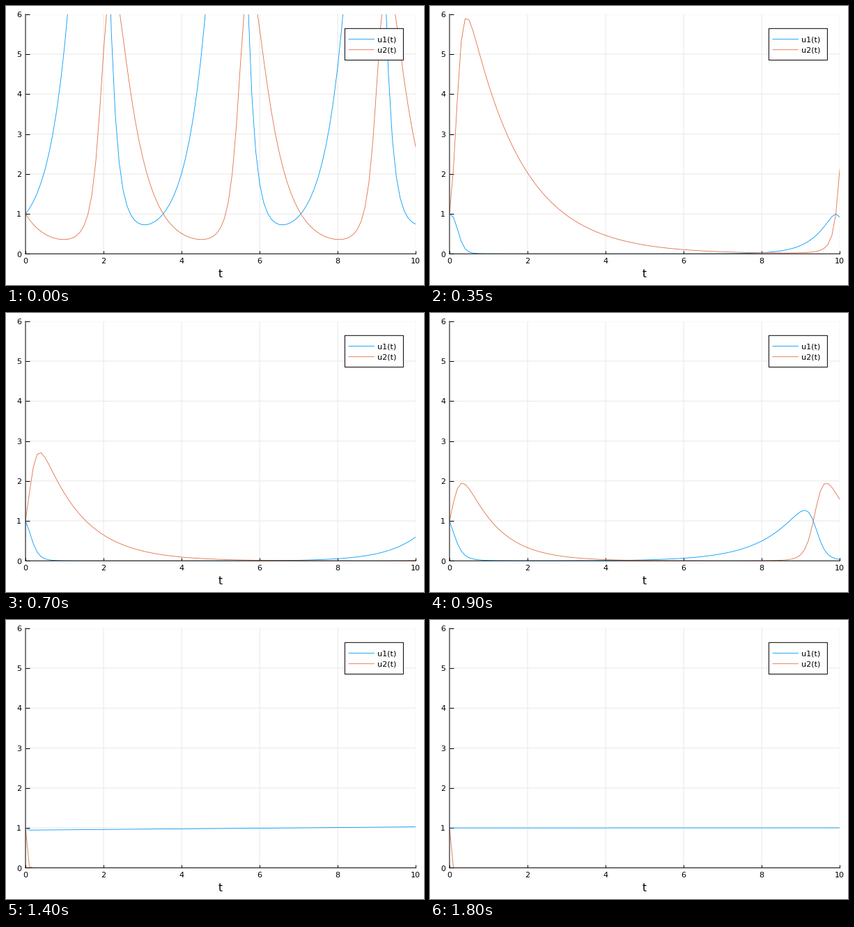
Animation of 600x400 px, one loop 1.9 s. Source, as a matplotlib script:

```python
import numpy as np
import matplotlib.pyplot as plt
from matplotlib.animation import FuncAnimation
from matplotlib.patches import Rectangle

plt.rcParams.update({"font.family": "DejaVu Sans", "path.snap": False})

W, H, DPI = 600, 400, 100
LEFT, RIGHT, TOP, BOTTOM = 28.0, 588.2, 11.8, 355.3
BLUE, ORANGE, GRID = "#009afa", "#e26f46", "#e8e8e8"
PX = 72 / DPI
CURVE = 0.85 * PX
LAST, HOLD = 35, 1  # last fitting step, extra frames on the first one

# Predator-prey parameters at a few fitting steps:
# prey growth, predation, predator death, predator gain
POSES = {
    0: (2.2, 1.0, 2.0, 0.4),
    6: (2.0775, 1.96, 0.74, 8.5),
    13: (1.214, 3.2, 0.965, 7.18),
    17: (1.02, 3.56, 1.21, 5.8),
    23: (0.0825, 4.41, 4.7, -2.0),
    27: (0.0083, 2.15, 22.0, -16.0),
    LAST: (0.0003, 0.15, 60.0, -45.0),
}


def fit_path():
    """Rates move geometrically between poses, the gain linearly."""
    steps = np.arange(LAST + 1)
    rows = np.array(list(POSES.values())).T
    rates = [np.exp(np.interp(steps, list(POSES), np.log(r))) for r in rows[:3]]
    return *rates, np.interp(steps, list(POSES), rows[3])


def solve(sub=20, save=0.1, count=100):
    """Integrate all fitting steps at once with RK4."""
    growth, predation, death, gain = fit_path()

    def slope(u):
        x, y = u
        return np.array([x * (growth - predation * y), y * (gain * x - death)])

    h = save / sub
    u = np.ones((2, LAST + 1))
    out = [u]
    for _ in range(count):
        for _ in range(sub):
            k1 = slope(u)
            k2 = slope(u + h / 2 * k1)
            k3 = slope(u + h / 2 * k2)
            k4 = slope(u + h * k3)
            u = u + h / 6 * (k1 + 2 * k2 + 2 * k3 + k4)
        out.append(u)
    return np.array(out)


t = np.linspace(0, 10, 101)
sol = solve()

fig = plt.figure(figsize=(W / DPI, H / DPI), dpi=DPI, facecolor="white")

ax = fig.add_axes([LEFT / W, 1 - BOTTOM / H,
                   (RIGHT - LEFT) / W, (BOTTOM - TOP) / H])
ax.set(xlim=(0, 10), ylim=(0, 6), xticks=range(0, 11, 2), yticks=range(7))
ax.set_axisbelow(True)
ax.grid(color=GRID, linewidth=PX)
ax.spines[["top", "right"]].set_visible(False)
ax.spines[["left", "bottom"]].set_linewidth(PX)
ax.tick_params(direction="in", width=PX, labelbottom=False, labelleft=False)
ax.tick_params(axis="x", length=4 * PX)
ax.tick_params(axis="y", length=6 * PX)
prey, = ax.plot([], [], color=BLUE, lw=CURVE)
pred, = ax.plot([], [], color=ORANGE, lw=CURVE)

# Overlay in pixel coordinates for labels and legend
top = fig.add_axes([0, 0, 1, 1], zorder=2)
top.set(xlim=(0, W), ylim=(H, 0))
top.axis("off")


def put(x, y, text, size=8, ha="center"):
    top.text(x, y, text, fontsize=size, ha=ha, va="baseline", color="black")


for v in range(0, 11, 2):
    put(LEFT - 0.5 + (RIGHT - LEFT) * v / 10, 369, str(v))
for v in range(7):
    put(22.3, BOTTOM - (BOTTOM - TOP) * v / 6 + 4.2, str(v), ha="right")
put((LEFT + RIGHT) / 2 - 0.5, 389, "t", size=11)

top.add_patch(Rectangle((486.4, 32.3), 84, 45.3, fc="white", ec="black", lw=PX))
for y, color, name in ((47.6, BLUE, "u1(t)"), (62.7, ORANGE, "u2(t)")):
    top.plot([492, 528.5], [y, y], color=color, lw=CURVE)
    put(533.5, y + 4, name, ha="left")


def draw(i):
    step = max(i - HOLD, 0)
    step = min(step, LAST)
    prey.set_data(t, sol[:, 0, step])
    pred.set_data(t, sol[:, 1, step])
    return prey, pred


anim = FuncAnimation(fig, draw, frames=LAST + 3, interval=50,
                     repeat=True, repeat_delay=0, blit=False)
plt.show()
```
